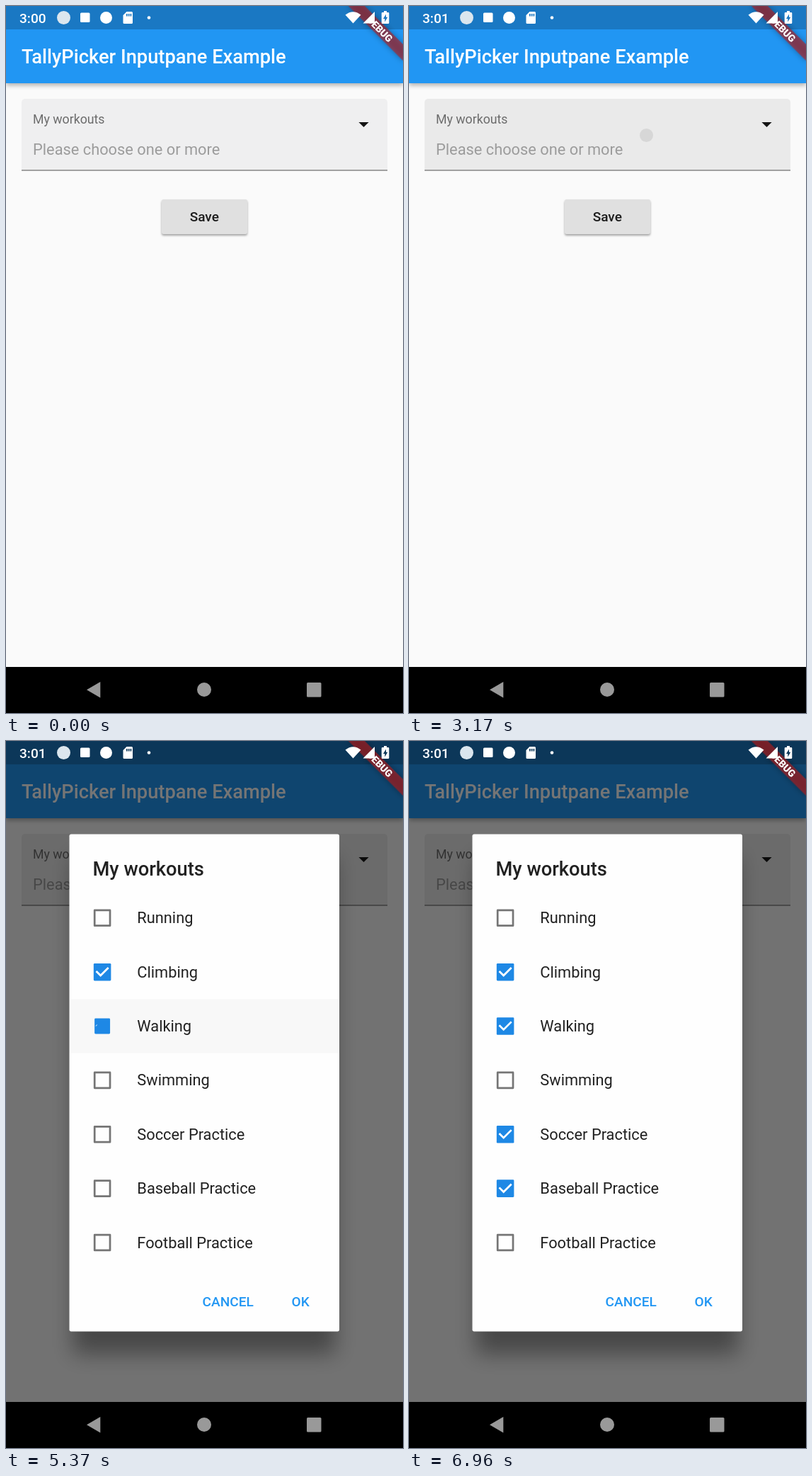
Recreate the animation shown at these times as an HTML page. Size 561 by 998 pixels, loop 8 s.

```html
<!DOCTYPE html>
<html lang="en">
<head>
<meta charset="utf-8">
<title>Workout picker</title>
<style>
  html, body { margin: 0; width: 100%; height: 100%; overflow: hidden; background: #000; }
  svg { display: block; width: 100%; height: 100%; font-family: Roboto, sans-serif; }
  .medium { font-weight: 500; }
  .title { font-size: 27.27px; font-weight: 500; }
  .body { font-size: 21.82px; }
  .button { font-size: 19.09px; font-weight: 500; }
  .bar { filter: drop-shadow(0 3px 3px rgba(0, 0, 0, .3)); }
  .raised { filter: drop-shadow(0 2px 1.5px rgba(0, 0, 0, .35)); }
  .ribbon { filter: drop-shadow(0 0 3px rgba(0, 0, 0, .5)); }
</style>
</head>
<body>
<svg viewBox="0 0 561 998" preserveAspectRatio="none">
  <defs>
    <filter id="soft" x="-30%" y="-30%" width="160%" height="160%"><feGaussianBlur stdDeviation="15"/></filter>
    <clipPath id="screen"><rect width="561" height="933"/></clipPath>
  </defs>

  <g clip-path="url(#screen)">
    <rect width="561" height="933" fill="#fafafa"/>
    <rect class="bar" width="561" height="109" fill="#2196f3"/>
    <rect width="561" height="33" fill="#000" fill-opacity=".2"/>
    <text class="title" x="22" y="81" fill="#fff">TallyPicker Inputpane Example</text>

    <path id="field" d="M22 232V136.500q0-5.500 5.500-5.500h506q5.500 0 5.500 5.500V232z" fill="#efeff0"/>
    <circle id="splash" cx="335.500" cy="182.500" r="9.500" fill="#d7d7d7"/>
    <rect x="22" y="231.300" width="517" height="1.300" fill="#757575"/>
    <text x="38" y="166.300" font-size="17.730" fill="#6c6c6c">My workouts</text>
    <text class="body" x="38" y="210" fill="#9c9c9c">Please choose one or more</text>
    <path d="M498.400 164h14.200l-7.100 7.100z" fill="#151515"/>

    <rect class="raised" x="220" y="273" width="121" height="49" rx="2.700" fill="#e0e0e0"/>
    <text class="button" x="280.300" y="304.200" text-anchor="middle" fill="#1c1c1c">Save</text>

    <g id="dialog">
      <rect width="561" height="933" fill="#000" fill-opacity=".54"/>
      <rect x="95" y="165" width="370" height="700" fill="#000" fill-opacity=".38" filter="url(#soft)"/>
      <rect x="89.500" y="131.500" width="381.500" height="702" rx="2.700" fill="#fefefe"/>
      <text class="title" x="122.500" y="190" fill="#212121">My workouts</text>
      <g id="rows"></g>
      <g class="button" fill="#2196f3">
        <text x="277.500" y="797.500">CANCEL</text>
        <text x="403.500" y="797.500">OK</text>
      </g>
    </g>

    <g transform="translate(561) rotate(45) scale(1.3636)">
      <rect class="ribbon" x="-40" y="28" width="80" height="12" fill="#b71c1c" fill-opacity=".63"/>
      <text y="37.600" font-size="10.200" font-weight="900" text-anchor="middle" fill="#fff">DEBUG</text>
    </g>

    <g fill="#fff">
      <text id="clock" class="medium" x="19" y="23.500" font-size="19.090">3:00</text>
      <circle cx="81.500" cy="16.500" r="9.500" fill="#dbe6ee"/>
      <rect x="105" y="9.500" width="13.500" height="13.500" rx="1.500"/>
      <circle cx="141.500" cy="16.500" r="8.500"/>
      <path fill-rule="evenodd" d="M170.500 8h7q1.500 0 1.500 1.500v14q0 1.500-1.500 1.500h-10.500q-1.500 0-1.500-1.500V13zM170 11v3.500h1.700V11zM172.800 11v3.500h1.700V11zM175.600 11v3.500h1.700V11z"/>
      <circle cx="202" cy="16.500" r="2.300"/>
      <path d="M479.500 12.500q11-8.500 22 0L490.500 24.500z"/>
      <path d="M521 8v16.500h-16.500z"/>
      <path fill-rule="evenodd" d="M534 7h4v2h2q1.300 0 1.300 1.300v13.400q0 1.300-1.300 1.300h-8q-1.300 0-1.300-1.300V10.300q0-1.300 1.300-1.300h2zM537 11.500l-4 6.500h2.300v4.500l4-6.700H537z"/>
    </g>
  </g>

  <rect y="933" width="561" height="65" fill="#000"/>
  <g fill="#999">
    <path d="M114 965.300l19.300-11.300v22.600z"/>
    <circle cx="280" cy="965" r="10"/>
    <rect x="425" y="955" width="20.500" height="20.500" rx="1.500"/>
  </g>
</svg>

<script>
const LOOP = 8000, CLOCK_TICK = 1720, PRESS = 3170, OPEN = 4400;
const DP = 1.3636, BOX = 18 * DP, STROKE = 2 * DP;
const ITEMS = [
  ["Running"], ["Climbing", 4440], ["Walking", 5160], ["Swimming"],
  ["Soccer Practice", 5860], ["Baseball Practice", 6660], ["Football Practice"]
];
const byId = id => document.getElementById(id);
const clamp = v => Math.min(1, Math.max(0, v));

function add(parent, tag, attrs) {
  const node = document.createElementNS("http://www.w3.org/2000/svg", tag);
  set(node, attrs);
  return parent.appendChild(node);
}

function set(node, attrs) {
  for (const name in attrs) node.setAttribute(name, attrs[name]);
}

const rows = ITEMS.map(([label, tap = Infinity], i) => {
  const y = 249.8 + i * 56 * DP;
  const g = add(byId("rows"), "g", { transform: `translate(0 ${y})` });
  const highlight = add(g, "rect", { x: 89.5, y: -38.2, width: 381.5, height: 76.4, fill: "#bcbcbc" });
  add(g, "text", { class: "body", x: 185.3, y: 7.6, fill: "#212121" }).textContent = label;
  const box = add(g, "g", { transform: "translate(136.100 0)" });
  return {
    tap, highlight,
    frame: add(box, "path", { "fill-rule": "evenodd" }),
    tick: add(box, "path", { fill: "none", stroke: "#fff", "stroke-width": STROKE })
  };
});

// A rounded square centred on the origin
function square(half, radius) {
  const side = 2 * (half - radius), arc = (x, y) => `a${radius} ${radius} 0 0 1 ${x} ${y}`;
  return `M${radius - half} ${-half}h${side}${arc(radius, radius)}v${side}${arc(-radius, radius)}` +
    `h${-side}${arc(-radius, -radius)}v${-side}${arc(radius, -radius)}z`;
}

function tickPath(p) {
  if (p <= 0) return "";
  const point = (x, y) => `${(x - .5) * BOX} ${(y - .5) * BOX}`;
  const short = clamp(p * 2), long = clamp(p * 2 - 1);
  let d = `M${point(.15, .45)}L${point(.15 + .25 * short, .45 + .25 * short)}`;
  if (long) d += `L${point(.4 + .45 * long, .7 - .45 * long)}`;
  return d;
}

function drawRow(row, time) {
  const step = Math.floor((time - row.tap + 4) / 42.8);
  const p = step >= 7 ? 1 : clamp(.52 + (step - 5) * .215);
  const glow = step < 0 ? 0 : Math.max(0, Math.min((step + 1) * .08, (7 - step) * .045));
  const half = BOX / 2 - DP * (1 - Math.abs(p - .5) * 2);
  const hole = half - STROKE - BOX * p * 2;
  set(row.highlight, { "fill-opacity": glow });
  set(row.frame, {
    d: square(half, DP) + (hole > 0 ? square(hole, 0) : ""),
    fill: p > .05 ? "#1e88e5" : "#757575"
  });
  set(row.tick, { d: tickPath(p * 2 - 1) });
}

function draw(time) {
  byId("clock").textContent = time < CLOCK_TICK ? "3:00" : "3:01";
  const pressed = time >= PRESS;
  set(byId("field"), { fill: pressed ? "#eaeaea" : "#efeff0" });
  set(byId("splash"), { visibility: pressed && time < OPEN ? "visible" : "hidden" });
  set(byId("dialog"), { visibility: time >= OPEN ? "visible" : "hidden" });
  rows.forEach(row => drawRow(row, time));
}

const start = performance.now();
function tick() {
  draw((performance.now() - start) % LOOP);
  requestAnimationFrame(tick);
}
tick();
</script>
</body>
</html>
```
